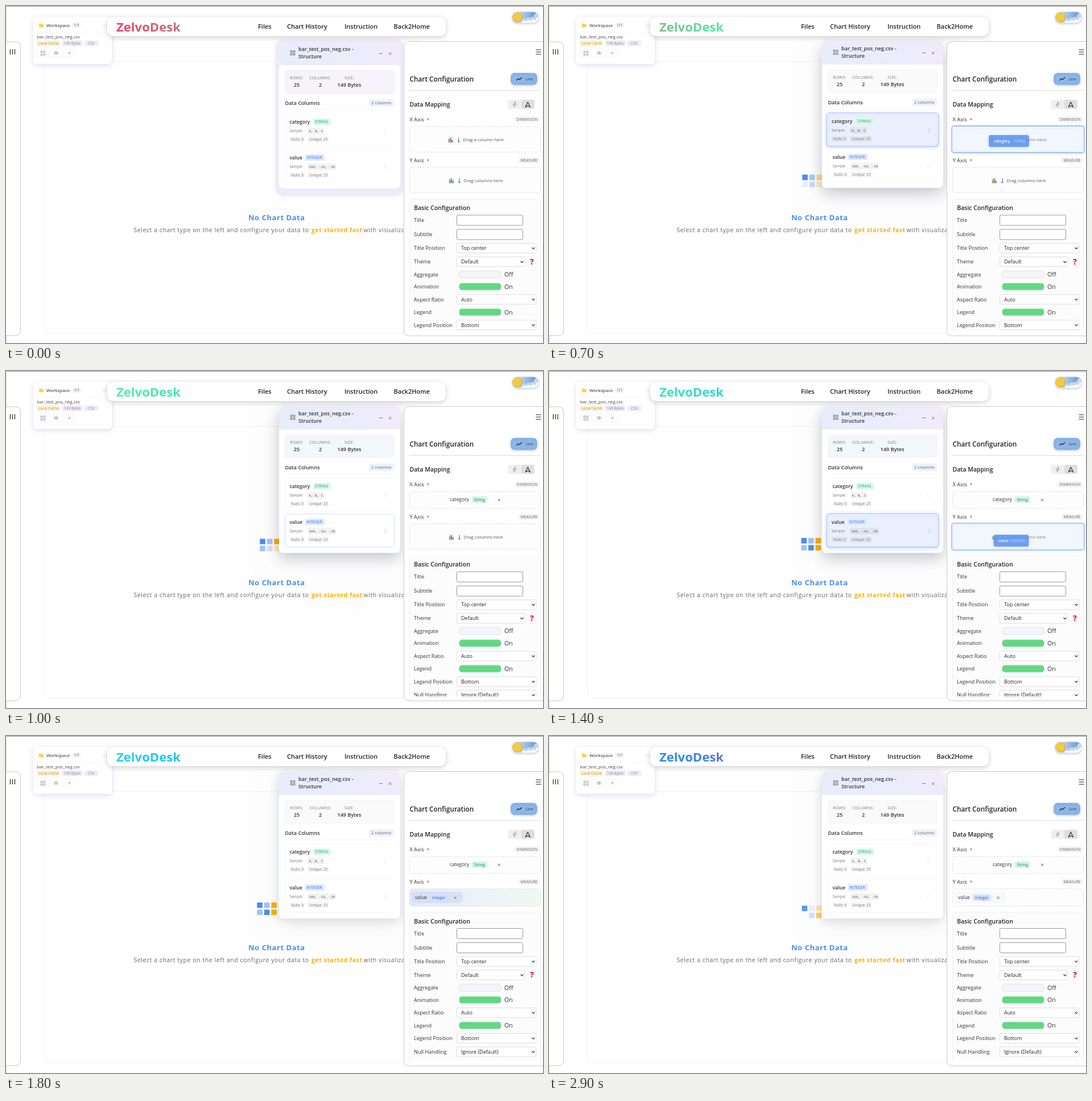
Recreate the animation shown at these times as an HTML page with a canvas. Size 944 px wide and 593 px high, loop 3 s.

```html
<!DOCTYPE html>
<html lang="en">
<head>
<meta charset="utf-8">
<title>Chart workspace</title>
<style>
html, body { margin: 0; width: 100%; height: 100%; overflow: hidden; background: #fff; }
canvas { display: block; }
</style>
</head>
<body>
<canvas id="stage" width="944" height="593"></canvas>
<script>
const ctx = document.getElementById('stage').getContext('2d');
const INK = '#333', GREY = '#777', BLUE = '#4a8df6', PALE_BLUE = '#a0c3fb', ORANGE = '#ffae00', GREEN = '#62d883';
const LOOP = 3000;

// x is the left edge (or centre), y the middle of the capitals
function text(str, x, y, size, color = INK, { weight = 400, align = 'left', spacing = 0, family = '"Open Sans", "Noto Sans", sans-serif' } = {}) {
  ctx.font = `${weight} ${size}px ${family}`;
  ctx.letterSpacing = spacing + 'px';
  ctx.textAlign = align;
  ctx.fillStyle = color;
  ctx.fillText(str, x, y + size * 0.36);
}
const bold = (str, x, y, size, color) => text(str, x, y, size, color, { weight: 600 });

function box(x, y, w, h, r, fill, stroke, line = 1) {
  ctx.beginPath();
  ctx.roundRect(x, y, w, h, r);
  if (fill) { ctx.fillStyle = fill; ctx.fill(); }
  if (stroke) { ctx.strokeStyle = stroke; ctx.lineWidth = line; ctx.stroke(); }
}

function shadowBox(color, blur, dy, ...args) {
  ctx.save();
  ctx.shadowColor = color;
  ctx.shadowBlur = blur;
  ctx.shadowOffsetY = dy;
  box(...args);
  ctx.restore();
}

function path(points, color, line = 1) {
  ctx.beginPath();
  points.forEach(([x, y]) => ctx.lineTo(x, y));
  ctx.strokeStyle = color;
  ctx.lineWidth = line;
  ctx.stroke();
}

function circle(x, y, r, fill) {
  ctx.beginPath();
  ctx.arc(x, y, r, 0, 7);
  ctx.fillStyle = fill;
  ctx.fill();
}

function cross(x, y, r, color) {
  path([[x - r, y - r], [x + r, y + r]], color);
  path([[x - r, y + r], [x + r, y - r]], color);
}

function grid(x, y, cols, rows, pitch, size, color) {
  ctx.fillStyle = color;
  for (let i = 0; i < cols * rows; i++)
    ctx.fillRect(x + (i % cols) * pitch, y + Math.floor(i / cols) * pitch, size, size);
}

function tiles(x, y, color) {
  for (let i = 0; i < 4; i++) box(x + (i % 2) * 5, y + (i >> 1) * 5, 3, 3, 0.5, null, color, 0.9);
}

function across(x0, x1, ...colors) {
  const g = ctx.createLinearGradient(x0, 0, x1, 0);
  colors.forEach((c, i) => g.addColorStop(i / (colors.length - 1), c));
  return g;
}

// Linear interpolation through rows of [time, ...values]
function track(keys, t) {
  const i = keys.findIndex(k => k[0] > t);
  if (i < 0) return keys.at(-1).slice(1);
  const a = keys[i - 1], b = keys[i], f = (t - a[0]) / (b[0] - a[0]);
  return a.slice(1).map((v, j) => v + (b[j + 1] - v) * f);
}

const during = (t, from, to) => t >= from && t < to;

function drawShell() {
  ctx.fillStyle = '#fff';
  ctx.fillRect(0, 0, 944, 593);
  ctx.fillStyle = '#999';
  ctx.fillRect(0, 0, 944, 1);
  ctx.fillStyle = '#ddd';
  ctx.fillRect(0, 0, 1, 593);
  box(67.5, 59.5, 660, 516, 8, '#fefefe', '#f3f3f4');
  path([[67, 97.5], [700, 97.5]], '#f1f1f2');
  box(-12, 63, 37.5, 517, 8, '#fff', '#c4c4c8');
  for (const x of [7.5, 11.5, 15.5]) path([[x, 76], [x, 85]], '#333', 1.3);

  text('No Chart Data', 426, 372.5, 13, BLUE, { weight: 700, spacing: 0.55 });
  const wide = { spacing: 0.62 };
  text('Select a chart type on the left and configure your data to', 224.5, 394.5, 10.4, '#666', wide);
  text('get started fast', 537, 394.5, 10.4, ORANGE, { weight: 700, spacing: 0.62 });
  text('with visualization', 628.5, 394.5, 10.4, '#666', wide);
}

function drawWorkspace() {
  shadowBox('rgba(140,120,230,.28)', 8, 2, 47.5, 19, 138.5, 83, 6, '#fff');
  path([[48, 46.5], [185, 46.5]], '#f6f4fb');
  box(58, 31, 4, 3, 1, '#f5c542');
  box(58, 32, 8, 5.5, 1, '#fbd152');
  bold('Workspace', 71, 34, 7.8, '#555');
  box(116, 28.5, 16, 10.5, 5, '#f4f4f6');
  text('1/1', 119, 34, 6.8, '#555');
  grid(170, 32, 3, 2, 3, 1, '#c9c9ce');
  text('bar_test_pos_neg.csv', 54.5, 54, 7.7, '#444');
  box(54, 60.5, 41, 10, 2.5, '#fff3dc');
  text('Local Cache', 57, 65.5, 6.5, '#c68a2c');
  box(98.5, 60.5, 36, 10, 2.5, '#eeeaf6');
  text('149 Bytes', 102, 65.5, 6.4, '#8d879c');
  box(138, 60.5, 24, 10, 2.5, '#efebfa');
  text('CSV', 144, 65.5, 6.6, '#8f84ab');
  for (const x of [54.5, 78, 101.5]) box(x, 75.5, 20, 14.5, 3, '#fff', '#f4f3f7');
  tiles(61, 79, '#999');
  ctx.beginPath();
  ctx.ellipse(88, 82.7, 3.8, 2.4, 0, 0, 7);
  ctx.stroke();
  circle(88, 82.7, 1.2, '#999');
  cross(111.5, 82.7, 2, '#999');
}

function drawNav(t) {
  shadowBox('rgba(0,0,0,.2)', 8, 2, 178, 19.5, 595, 33.5, 10, '#fff');
  const span = 377, start = 194 - t / 1000 * span;
  const rainbow = across(start, start + 4 * span, '#f0406a', '#50f0a0', '#1cccf0', '#2f88f0', '#f0406a');
  text('ZelvoDesk', 194, 37, 22.1, rainbow, { weight: 700 });
  [['Files', 443], ['Chart History', 494], ['Instruction', 595], ['Back2Home', 681.5]]
    .forEach(([label, x]) => bold(label, x, 36.5, 11, '#222'));
}

function drawThemeSwitch() {
  shadowBox('rgba(0,0,0,.25)', 3, 1, 889, 9.5, 48, 21, 10.5, '#f4f4f6');
  ctx.save();
  ctx.beginPath();
  ctx.roundRect(890, 10.5, 46, 19, 9.5);
  ctx.clip();
  ctx.fillStyle = across(890, 936, '#e9eef4', '#9fbfe4', '#5c8fce');
  ctx.fillRect(889, 9, 48, 22);
  [[911, 30, 6], [919, 27, 5], [926, 26, 5], [933, 20, 5], [936, 26, 7]].forEach(([x, y, r]) => circle(x, y - 2, r, '#c5d7ec'));
  [[911, 31, 5], [919, 30, 5], [927, 29, 5], [936, 25, 5]].forEach(([x, y, r]) => circle(x, y, r, '#fff'));
  ctx.restore();
  circle(899, 20, 9, '#c9a63c');
  circle(898.8, 19.7, 8.3, '#f0cb45');
}

const BLOCK_KEYS = [ // time, x, y, opacity of each block
  [0, 444, 298, 0, 0, 0, 0, 0, 0],
  [300, 444, 298, 0, 0, 0, 0, 0, 0],
  [700, 445.2, 296.8, 1, 0.95, 0.45, 0.25, 0.3, 0.25],
  [1000, 446.2, 295.2, 1, 1, 1, 1, 0.25, 0.25],
  [1400, 443.4, 293.8, 1, 1, 1, 1, 1, 1],
  [1800, 441.3, 293, 1, 1, 1, 1, 1, 1],
  [2300, 446, 295.2, 0.12, 0.2, 0.6, 1, 1, 1],
  [2900, 444.5, 298.6, 0.9, 0.2, 0.3, 0.05, 0.25, 0.6]
];
const BLOCK_COLORS = [BLUE, PALE_BLUE, ORANGE, PALE_BLUE, BLUE, ORANGE];

function drawBlocks(t) {
  const [x, y, ...alphas] = track(BLOCK_KEYS, t);
  alphas.forEach((alpha, i) => {
    ctx.globalAlpha = alpha;
    box(x + (i % 3) * 12.5, y + Math.floor(i / 3) * 12.4, 9.6, 9.6, 0.5, BLOCK_COLORS[i]);
  });
  ctx.globalAlpha = 1;
}

function drawColumn(top, { name, tag, tagX, tagW, tagFill, tagInk, sample, sampleW, unique }, hover, dragged) {
  ctx.save();
  if (dragged) {
    ctx.translate(586.5, top + 29);
    ctx.scale(1.02, 1.02);
    ctx.translate(-586.5, -top - 29);
    shadowBox('rgba(74,141,246,.25)', 6, 2, 490, top, 193, 58, 5, '#eaf0fd', '#a5c2f4');
  } else box(490.5, top + 0.5, 192, 58, 5, '#fff', hover ? '#cfdff8' : '#f7f7f9');
  bold(name, 498.5, top + 14.5, 8.6);
  box(tagX, top + 8.5, tagW, 11.5, 2.5, tagFill);
  text(tag, tagX + 3, top + 14.3, 6.7, tagInk);
  text('Sample:', 498.5, top + 30.5, 6.4, GREY);
  box(530, top + 24.5, sampleW, 12, 2.5, dragged ? '#dfe4ef' : '#f3f3f4');
  text(sample, 532.5, top + 30.5, 5.9, '#555', { family: '"Liberation Mono", monospace' });
  const chip = dragged ? '#e1e7f3' : '#f7f7f8';
  box(498.5, top + 40, 27, 10.5, 2, chip);
  text('Nulls: 0', 501, top + 45.2, 6.4, GREY);
  box(530, top + 40, 38, 10.5, 2, chip);
  text('Unique: ' + unique, 533, top + 45.2, 6.4, GREY);
  grid(665, top + 27.5, 2, 3, 2.7, 1.1, dragged || hover ? '#9db8e6' : '#dcdce0');
  ctx.restore();
}

const CATEGORY = { name: 'category', tag: 'STRING', tagX: 540, tagW: 31, tagFill: '#d9f7e7', tagInk: '#2aa56f', sample: 'A, B, C', sampleW: 30, unique: 25 };
const VALUE = { name: 'value', tag: 'INTEGER', tagX: 525.5, tagW: 34.5, tagFill: '#dfe9fd', tagInk: '#3f72d8', sample: '100, -10, -20', sampleW: 50, unique: 23 };

function drawStructure(t) {
  const [drop] = track([[0, 1], [100, 1], [300, 0], [1500, 0], [1700, 1]], t);
  ctx.save();
  ctx.translate(0, drop);
  if (t < 700) shadowBox('rgba(150,125,225,.2)', 6, 0, 474, 58, 225, 275, 15, '#eeeaf8');
  else {
    const lifted = t < 1600;
    shadowBox('rgba(0,0,0,.04)', 44, 14, 480, 62, 213, 258, 8, '#fff');
    shadowBox(`rgba(40,45,80,${lifted ? 0.24 : 0.16})`, lifted ? 24 : 18, lifted ? 9 : 4, 480, 62, 213, 258, 8, '#fff');
  }
  box(480, 62, 213, 258, 8, '#fff');
  box(480, 62, 213, 41, [8, 8, 0, 0], across(480, 693, '#e8edfb', '#f0ebfb'));
  tiles(500, 77.5, '#555');
  bold('bar_test_pos_neg.csv -', 514, 75, 9.1);
  bold('Structure', 514, 87.3, 9.1);
  path([[656, 82.5], [662, 82.5]], GREY);
  cross(675.3, 83, 2.3, GREY);

  const statFill = t < 700 ? '#f6f4fa' : during(t, 900, 1600) ? '#f3f6fa' : '#fafafb';
  box(490.5, 112.5, 192, 40, 5, statFill, t < 700 ? '#efebf6' : '#f5f5f7');
  [['ROWS:', '25', 511], ['COLUMNS:', '2', 552.5], ['SIZE:', '149 Bytes', 603.5]].forEach(([label, value, x]) => {
    text(label, x, 125, 7, GREY, { align: 'center', spacing: 0.3 });
    text(value, x, 138, 9.1, INK, { weight: 600, align: 'center' });
  });
  bold('Data Columns', 490.5, 169.5, 9);
  box(638, 163, 44.5, 13, 3, '#eef2fb');
  text('2 columns', 642, 169.5, 7.4, '#566580');
  path([[491, 181.5], [683, 181.5]], '#f6f6f8');
  drawColumn(188.5, CATEGORY, false, during(t, 200, 800));
  drawColumn(251.3, VALUE, during(t, 900, 1200), during(t, 1200, 1500));
  ctx.restore();
}

function drawZone(y, { h, hint, hintX, hot, filled, hover }) {
  ctx.save();
  if (hot) {
    shadowBox('rgba(74,141,246,.2)', 5, 1, 708, y - 0.5, 233, h + 1, 4, '#f2f6fd', '#8cb3f0', 1.3);
  } else {
    const fill = hover ? across(709, 940, '#e2e9f9', '#ecf2fa', '#f0f8f2') : '#fdfdfe';
    ctx.setLineDash([2.5, 1.8]);
    box(709.5, y + 0.5, 230, h - 1, 5, fill, '#d9dade');
  }
  ctx.restore();
  if (filled) return;
  const mid = y + h / 2 + 1;
  ctx.globalAlpha = hot ? 0.75 : 1;
  box(hintX, mid - 5, 9.5, 10, 1, '#e9eef0');
  [['#5dbb63', 6], ['#e0605a', 8], ['#4a8fd8', 4.5]].forEach(([c, bar], i) => box(hintX + 1 + i * 2.7, mid + 4.5 - bar, 2.2, bar, 0, c));
  const ax = hintX + 19;
  path([[ax, mid - 4], [ax, mid + 4]], '#555');
  path([[ax - 1.7, mid + 2], [ax, mid + 4], [ax + 1.7, mid + 2]], '#555');
  text(hint, hintX + 26.5, mid, 7.8, '#555');
  ctx.globalAlpha = 1;
}

function drawField(x, y, name, tag, tagFill, tagInk, tagX, tagW, closeX) {
  text(name, x, y, 8.5);
  box(tagX, y - 5.8, tagW, 11.5, 4, tagFill);
  text(tag, tagX + 4, y, 7.1, tagInk);
  cross(closeX, y + 0.5, 2, '#666');
}

const FORM = [ // label, y, kind, value, right edge
  ['Title', 377, 'input'],
  ['Subtitle', 402, 'input'],
  ['Title Position', 426, 'select', 'Top center', 932],
  ['Theme', 450, 'select', 'Default', 912],
  ['Aggregate', 472.3, 'toggle', 'Off'],
  ['Animation', 493.8, 'toggle', 'On'],
  ['Aspect Ratio', 516.3, 'select', 'Auto', 932],
  ['Legend', 538.7, 'toggle', 'On'],
  ['Legend Position', 561.3, 'select', 'Bottom', 932],
  ['Null Handling', 585, 'select', 'Ignore (Default)', 932]
];

function drawForm(shift) {
  ctx.save();
  ctx.beginPath();
  ctx.rect(701, 320 - 15, 243, 267.5);
  ctx.clip();
  ctx.translate(0, -shift);
  box(709.5, 339.5, 230, 320, 6, '#fcfcfd', '#eeeef1');
  bold('Basic Configuration', 717.3, 355.5, 10.5, '#222');
  for (const [label, y, kind, value, right] of FORM) {
    text(label, 717, y, 9.15);
    if (kind === 'input') box(792.5, y - 9, 116, 18, 2, '#fff', '#999');
    if (kind === 'select') {
      box(792.5, y - 8.5, right - 792.5, 17, 2.5, '#fff', '#dedee3');
      text(value, 800, y, 9.05, '#222');
      path([[right - 7.5, y - 1.2], [right - 5, y + 1.5], [right - 2.5, y - 1.2]], '#333', 1.2);
    }
    if (kind === 'toggle') {
      box(796.5, y - 6.3, 74, 12.6, 5, value === 'On' ? GREEN : '#f4f5f9', value === 'On' ? '#cdeed6' : '#dfe1e8');
      text(value, 876, y, 10.6);
    }
  }
  text('?', 924.3, 450, 13.5, '#e3274e', { weight: 800, align: 'center' });
  ctx.restore();
}

function drawAxisLabel(name, role, roleW, y) {
  text(name, 709.5, y, 9.3);
  text('*', 739.5, y + 1, 9, '#e23a4a');
  box(939 - roleW, y - 5.5, roleW, 11, 5, '#f5f5f8');
  text(role, 939 - roleW / 2, y, 6.6, '#666', { align: 'center' });
}

function drawConfig(t) {
  const xFilled = t >= 800, yFilled = t >= 1500;
  box(699.5, 62.5, 260, 518, 8, '#fff', '#c9c9cf');
  for (const y of [77, 81, 85]) path([[931.5, y], [940.5, y]], '#333', 1.1);
  bold('Chart Configuration', 709.5, 128.3, 11.8, '#222');
  shadowBox('rgba(60,110,190,.4)', 4, 1, 888, 118.5, 45, 19.5, 6, '#8fb6e8', '#79a6e2');
  path([[897.5, 131], [900.5, 127.8], [903, 129.5], [907, 125.5]], '#222', 1.3);
  text('Line', 913.5, 128.3, 6.8, '#344');
  path([[709, 148.5], [940, 148.5]], '#dcdce0');
  bold('Data Mapping', 709.5, 172.8, 10.5, '#222');
  box(882.5, 165, 46.5, 16, 4, '#efeff2');
  box(906, 165, 23, 16, 4, '#dededf');
  path([[895.5, 168.5], [891, 173.8], [894, 173.8], [893, 177.5], [897.5, 172.2], [894.5, 172.2], [895.5, 168.5]], '#888', 0.8);
  path([[917.3, 169], [921.3, 177.5], [917.3, 175.6], [913.3, 177.5], [917.3, 169]], '#222', 1.1);

  drawAxisLabel('X Axis', 'DIMENSION', 46, 199.7);
  drawZone(211.5, { h: xFilled ? 31 : 46, hint: 'Drag a column here', hintX: 776.8, hot: during(t, 700, 800), filled: xFilled, hover: during(t, 800, 900) });
  if (xFilled) drawField(780, 226.3, 'category', 'String', '#d4f5e4', '#168a58', 818.5, 27.5, 867);

  const shiftX = xFilled ? 14.8 : 0;
  drawAxisLabel('Y Axis', 'MEASURE', 39, 271.4 - shiftX);
  const zoneY = 283.2 - shiftX, hoverY = during(t, 1500, 2000);
  drawZone(zoneY, { h: yFilled ? 31.5 : 46, hint: 'Drag columns here', hintX: 778, hot: during(t, 1300, 1500), filled: yFilled, hover: hoverY });
  if (yFilled) {
    box(713, zoneY + 5.5, 90, 20, 5, hoverY ? 'rgba(205,217,242,.6)' : '#f6f8fc');
    drawField(719, zoneY + 15.8, 'value', 'Integer', '#d3e1fc', '#2f62c9', 745, 31.5, 789.5);
  }
  drawForm(shiftX + (yFilled ? 14.6 : 0));
}

function drawChip(name, tag, w, tagDx, [x, y]) {
  shadowBox('rgba(74,141,246,.25)', 4, 1, x, y, w, 21, 3.5, 'rgba(84,143,241,.8)');
  bold(name, x + 8, y + 10.7, 7.1, '#fff');
  text(tag, x + tagDx, y + 10.7, 6.3, 'rgba(255,255,255,.65)');
}

function draw(t) {
  drawShell();
  drawBlocks(t);
  drawStructure(t);
  drawWorkspace();
  drawNav(t);
  drawThemeSwitch();
  drawConfig(t);
  if (during(t, 200, 800))
    drawChip('category', 'STRING', 71, 42.5, track([[200, 520, 197], [400, 650, 212], [600, 747, 223], [700, 773, 227], [800, 773, 227]], t));
  if (during(t, 1200, 1500))
    drawChip('value', 'INTEGER', 62, 30, track([[1200, 580, 272], [1300, 715, 283], [1400, 781.5, 288], [1500, 781.5, 288]], t));
}

function tick() {
  draw(Math.floor(performance.now() % LOOP / 100) * 100);
  requestAnimationFrame(tick);
}
tick();
</script>
</body>
</html>
```
